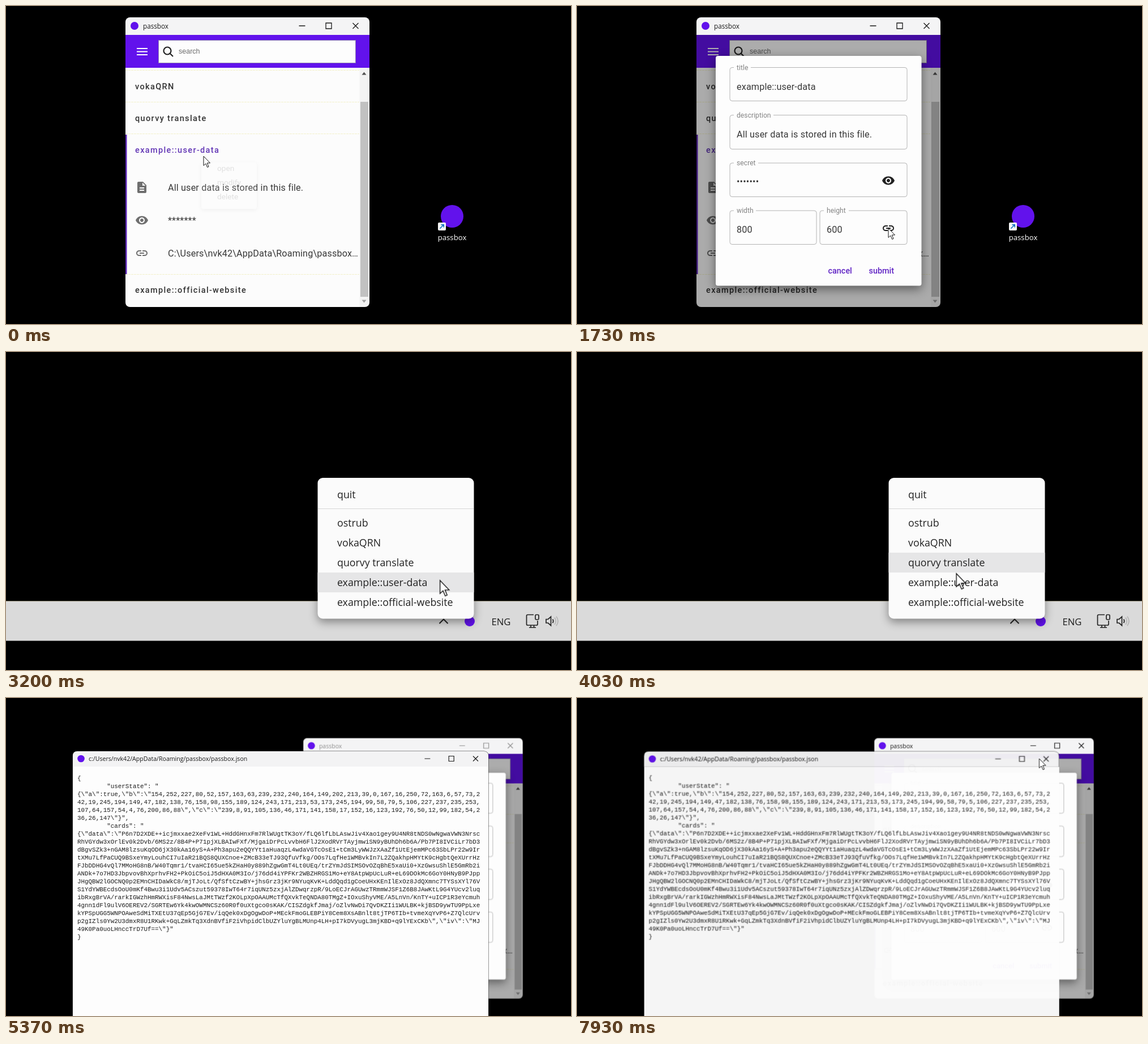
Write an HTML page that moves like this. It is 998 px wide and 561 px high and loops after 8 s.

```html
<!DOCTYPE html>
<html lang="en">
<head>
<meta charset="utf-8">
<title>passbox</title>
<style>
html, body { margin: 0; width: 100%; height: 100%; overflow: hidden; background: #000; }
svg { display: block; width: 998px; height: 561px; }
text { font-family: Roboto, sans-serif; }
.ui, .ui text { font-family: "Open Sans", "Noto Sans", sans-serif; }
.name { font-size: 14.5px; font-weight: 500; letter-spacing: 1.35px; fill: #333; }
.body { font-size: 16.2px; letter-spacing: .15px; fill: #383838; }
.label { font-size: 12.2px; fill: #858585; }
.button { font-size: 14.4px; font-weight: 500; fill: #5f22c4; }
.field { fill: none; stroke: #b4b4b4; }
.focus { stroke: #5520b4; stroke-width: 2px; }
.gap { fill: #fdfdfd; }
.accent { fill: #6236b5; }
.brand { fill: #6212ec; }
.rule { stroke: #f3f1cc; }
#json text { font: 10.88px "Liberation Mono", "Courier New", monospace; fill: #1c1c1c; }

/* one loop: 1% = 80 ms */
.t, .s { animation: 8s linear infinite; }
.s { animation-timing-function: step-end; }

#win { animation-name: win; }
@keyframes win {
  0% { opacity: 1; transform: none; }
  26% { opacity: 0; transform: none; }
  62.875%, 100% { opacity: 1; transform: translate(335.1px, 52.6px) scale(.9); }
}
#caption { animation-name: caption; }
@keyframes caption {
  0% { color: #1a1a1a; }
  62.875% { color: #8f8f8f; }
  82.4%, 100% { color: #1a1a1a; }
}
#desktop { animation-name: desktop; }
@keyframes desktop { 0% { opacity: 1; } 26%, 100% { opacity: 0; } }

#context { animation-name: context; }
@keyframes context {
  0% { opacity: .12; }
  1.9%, 6.2% { opacity: 1; }
  7.2%, 100% { opacity: 0; }
}
#scrim { animation-name: scrim; }
@keyframes scrim { 0%, 6.5% { opacity: 0; } 8.4%, 100% { opacity: .32; } }
#dialog { animation-name: dialog; transform-origin: 426px 290px; }
@keyframes dialog {
  0%, 6.5% { opacity: 0; transform: scale(.8); }
  8.4%, 100% { opacity: 1; transform: none; }
}
#urlMode { animation-name: urlMode; }
@keyframes urlMode { 0% { opacity: 1; } 18%, 100% { opacity: 0; } }
#sizeMode { animation-name: sizeMode; }
@keyframes sizeMode { 0% { opacity: 0; } 18%, 100% { opacity: 1; } }
#caret { animation-name: caret; }
@keyframes caret { 0% { opacity: 1; } 14.1%, 100% { opacity: 0; } }

#taskbar { animation-name: taskbar; }
@keyframes taskbar { 0% { opacity: 0; } 26% { opacity: 1; } 62.875%, 100% { opacity: 0; } }
#trayHover { animation-name: trayHover; }
@keyframes trayHover { 0% { opacity: 0; } 29.5% { opacity: 1; } 38%, 100% { opacity: 0; } }
#trayMenu { animation-name: trayMenu; }
@keyframes trayMenu { 0% { opacity: 0; } 36.9% { opacity: 1; } 62.3%, 100% { opacity: 0; } }
#row { animation-name: row; }
@keyframes row {
  0% { opacity: 0; transform: translateY(70px); }
  37.3% { opacity: 1; transform: translateY(70px); }
  39% { opacity: 1; transform: translateY(35px); }
  40.7% { opacity: 1; transform: none; }
  42.4% { opacity: 1; transform: translateY(-35px); }
  46.7% { opacity: 1; transform: none; }
  50.6%, 100% { opacity: 1; transform: translateY(35px); }
}

#doc { animation-name: doc; }
@keyframes doc {
  0%, 62.87% { opacity: 0; transform: translate(42px, 33px) scale(.9); }
  62.88% { opacity: .7; transform: translate(36px, 28px) scale(.915); }
  63.75% { opacity: .94; transform: translate(20.8px, 16.6px) scale(.951); }
  65%, 82.4% { opacity: 1; transform: none; }
  82.41%, 100% { opacity: .97; transform: translate(.7px, .6px) scale(.998); }
}
#page { animation-name: page; }
@keyframes page { 0% { opacity: 0; } 67%, 100% { opacity: 1; } }
#maxHover { animation-name: maxHover; }
@keyframes maxHover { 0%, 76% { opacity: 0; } 77%, 77.9% { opacity: 1; } 79%, 100% { opacity: 0; } }
#closeHover { animation-name: closeHover; }
@keyframes closeHover {
  0%, 76.9% { opacity: 0; }
  77.875% { opacity: .4; }
  79%, 82.4% { opacity: 1; }
  82.41%, 100% { opacity: 0; }
}
#closeMark { animation-name: closeMark; }
@keyframes closeMark {
  0%, 76.9% { color: #1a1a1a; }
  77.875% { color: #a58a87; }
  79%, 82.4% { color: #fff; }
  82.41%, 100% { color: #1a1a1a; }
}

#pointer { animation-name: pointer; }
@keyframes pointer {
  0%, 1.25% { opacity: 1; transform: translate(349px, 265px); }
  5.25%, 6.5% { opacity: 1; transform: translate(385px, 312px); }
  6.51% { opacity: 0; transform: translate(385px, 312px); }
  11.49% { opacity: 0; transform: translate(400px, 300px); }
  11.5% { opacity: 1; transform: translate(400px, 300px); }
  16.9%, 25.99% { opacity: 1; transform: translate(550px, 392px); }
  26% { opacity: 1; transform: translate(720px, 360px) scale(1.4); }
  31.2%, 31.7% { opacity: 1; transform: translate(830px, 447px) scale(1.4); }
  34.4%, 36.9% { opacity: 1; transform: translate(822px, 468px) scale(1.4); }
  43.75% { opacity: 1; transform: translate(700px, 325px) scale(1.4); }
  50.4% { opacity: 1; transform: translate(670px, 391px) scale(1.4); }
  53%, 62.87% { opacity: 1; transform: translate(662px, 408px) scale(1.4); }
  62.88%, 68.74% { opacity: 0; transform: translate(760px, 250px); }
  68.75% { opacity: 1; transform: translate(760px, 250px); }
  76.9%, 78% { opacity: 1; transform: translate(815.5px, 108px); }
  82.4%, 100% { opacity: 1; transform: translate(816.5px, 107px); }
}
</style>
</head>
<body>
<svg viewBox="0 0 998 561">
  <defs>
    <clipPath id="winShape"><rect x="211" y="20" width="431" height="511" rx="8"/></clipPath>
    <clipPath id="urlBox"><rect x="280" y="375" width="250" height="35"/></clipPath>
    <path id="minMax" d="M-52.5 0H-41.5M-5 -5H5V5H-5Z" fill="none" stroke="currentColor" stroke-width="1.3"/>
    <path id="cross" d="M-5 -5L5 5M5 -5L-5 5" fill="none" stroke="currentColor" stroke-width="1.3"/>
    <path id="eye" d="M12 4.5C7 4.5 2.73 7.61 1 12c1.73 4.39 6 7.5 11 7.5s9.27-3.11 11-7.5c-1.73-4.39-6-7.5-11-7.5zM12 17c-2.76 0-5-2.24-5-5s2.24-5 5-5 5 2.24 5 5-2.24 5-5 5zm0-8c-1.66 0-3 1.34-3 3s1.34 3 3 3 3-1.34 3-3-1.34-3-3-3z"/>
    <path id="link" d="M3.9 12c0-1.71 1.39-3.1 3.1-3.1h4V7H7c-2.76 0-5 2.24-5 5s2.24 5 5 5h4v-1.9H7c-1.71 0-3.1-1.39-3.1-3.1zM8 13h8v-2H8v2zm9-6h-4v1.9h4c1.71 0 3.1 1.39 3.1 3.1s-1.39 3.1-3.1 3.1h-4V17h4c2.76 0 5-2.24 5-5s-2.24-5-5-5z"/>
    <g id="gear" fill="none" stroke="#222">
      <circle r="5.3" stroke-width="4"/>
      <circle r="8" stroke-width="4" stroke-dasharray="4.6 3.778" transform="rotate(14)"/>
    </g>
  </defs>

  <g id="desktop" class="s">
    <circle class="brand" cx="788" cy="371" r="20"/>
    <rect x="763" y="382" width="14" height="14" rx="2" fill="#f6f6f6"/>
    <path d="M766.5 392.5L773 386M768.5 385.8H773.2V390.5" fill="none" stroke="#1673c4" stroke-width="1.7"/>
    <text class="ui" x="788" y="413" font-size="13.2" fill="#fff" text-anchor="middle">passbox</text>
  </g>

  <g id="win" class="s">
    <g clip-path="url(#winShape)">
      <rect x="211" y="20" width="431" height="511" fill="#fcfcfc"/>
      <rect x="211" y="20" width="431" height="31" fill="#f4f4f5"/>
      <circle class="brand" cx="227" cy="35" r="7"/>
      <g id="caption" class="s">
        <text class="ui" x="242" y="39.5" font-size="11.7" fill="currentColor">passbox</text>
        <use href="#minMax" x="570" y="35"/>
        <use href="#cross" x="617.5" y="35"/>
      </g>

      <rect class="brand" x="211" y="51" width="431" height="58"/>
      <path d="M231 75H250M231 80.5H250M231 86H250" stroke="#fff" stroke-width="2"/>
      <rect x="269.5" y="60.5" width="348" height="40" fill="#fdfdfd" stroke="#8d7fb0"/>
      <g fill="none" stroke="#222" stroke-width="2.2"><circle cx="285" cy="79" r="6.5"/><path d="M289.5 83.5L295 89"/></g>
      <text x="305" y="84" font-size="12.5" fill="#6c6c6c" style="font-family:'Liberation Sans',Arial,sans-serif">search</text>

      <path class="rule" stroke-dasharray="4 1" d="M211 113.5H624M211 169.5H624M211 225.5H624M211 473.5H624"/>
      <text class="name" x="228" y="147">vokaQRN</text>
      <text class="name" x="228" y="203">quorvy translate</text>
      <rect x="211" y="227" width="2.5" height="246" fill="#5b25b5"/>
      <text class="name accent" x="228" y="259">example::user-data</text>
      <text class="name" x="228" y="506">example::official-website</text>
      <g fill="#6f6f6f">
        <path transform="translate(228 308)" d="M14 2H6c-1.1 0-2 .9-2 2v16c0 1.1.9 2 2 2h12c1.1 0 2-.9 2-2V8l-6-6zm2 16H8v-2h8v2zm0-4H8v-2h8v2zm-3-5V3.5L18.5 9H13z"/>
        <use href="#eye" x="228" y="366"/>
        <use href="#link" x="228" y="424"/>
      </g>
      <text class="body" x="286" y="326">All user data is stored in this file.</text>
      <text class="body" x="286" y="384">*******</text>
      <text class="body" x="286" y="442">C:\Users\nvk42\AppData\Roaming\passbox…</text>

      <rect x="624.5" y="109" width="18" height="422" fill="#f3f3f3"/>
      <rect x="626" y="169" width="14" height="344" fill="#c1c1c1"/>
      <path d="M628.5 121.5L632.5 116.5L636.5 121.5Z" fill="#505050"/>
      <path d="M628.5 518.5L632.5 523.5L636.5 518.5Z" fill="#a0a0a0"/>

      <g id="context" class="t">
        <rect x="345" y="276" width="98" height="82" rx="4" fill="#fdfdfd" style="filter:drop-shadow(0 2px 4px #0006)"/>
        <g font-size="13.7" fill="#2c2c2c">
          <text x="373" y="291">open</text><text x="373" y="316">modify</text><text x="373" y="341">delete</text>
        </g>
      </g>

      <rect id="scrim" class="t" x="211" y="51" width="431" height="480"/>
      <g id="dialog" class="t">
        <rect x="245" y="88" width="363.5" height="405.5" rx="4" fill="#fdfdfd" style="filter:drop-shadow(0 6px 9px #0007)"/>
        <rect class="field" x="270" y="108.5" width="313" height="59" rx="4"/>
        <rect class="field" x="270" y="192.5" width="313" height="60" rx="4"/>
        <rect class="field" x="270" y="277" width="313" height="59.5" rx="4"/>
        <path class="gap" d="M277 104H307V112H277ZM277 188H347V197H277ZM277 272H320V281H277Z"/>
        <text class="label" x="282" y="112.5">title</text>
        <text class="label" x="282" y="196.5">description</text>
        <text class="label" x="282" y="280.5">secret</text>
        <text class="body" x="282" y="148">example::user-data</text>
        <text class="body" x="282" y="232">All user data is stored in this file.</text>
        <text class="body" x="282" y="315">•••••••</text>
        <use href="#eye" x="538" y="296" fill="#222"/>

        <g id="urlMode" class="s">
          <rect class="field focus" x="270.5" y="108.5" width="312" height="59" rx="4"/>
          <path class="gap" d="M277 104H307V112H277Z"/>
          <text class="label accent" x="282" y="112.5">title</text>
          <path id="caret" class="s" d="M423.5 133V152" stroke="#333"/>
          <rect class="field" x="270" y="361" width="313" height="59.5" rx="4"/>
          <rect class="gap" x="277" y="357" width="23" height="8"/>
          <text class="label" x="282" y="364.5">url</text>
          <g clip-path="url(#urlBox)"><text class="body" x="282" y="400">C:\Users\nvk42\AppData\Roaming\passbox</text></g>
          <use href="#gear" x="550" y="392"/>
        </g>
        <g id="sizeMode" class="s">
          <rect class="field" x="270" y="361" width="153" height="59.5" rx="4"/>
          <rect class="field" x="429" y="361" width="154" height="59.5" rx="4"/>
          <path class="gap" d="M277 357H316V365H277ZM436 357H480V365H436Z"/>
          <text class="label" x="282" y="364.5">width</text>
          <text class="label" x="441" y="364.5">height</text>
          <text class="body" x="282" y="400">800</text>
          <text class="body" x="441" y="400">600</text>
          <use href="#link" x="538" y="380" fill="#222"/>
        </g>
        <text class="button" x="443.5" y="472">cancel</text>
        <text class="button" x="515.5" y="472">submit</text>
      </g>
    </g>
  </g>

  <g id="taskbar" class="s ui">
    <rect y="439.5" width="998" height="70" fill="#dadada"/>
    <path d="M0 439.5H998" stroke="#8f8a74"/>
    <rect id="trayHover" class="s" x="798" y="447" width="43" height="56" rx="4" fill="#e8e8e8"/>
    <path d="M765.5 479L773 471.5L780.5 479" fill="none" stroke="#222" stroke-width="2"/>
    <circle class="brand" cx="819" cy="475" r="9"/>
    <text x="857.5" y="482" font-size="16.7" fill="#1c1c1c">ENG</text>
    <g fill="none" stroke="#222" stroke-width="1.7">
      <path d="M932 463.5H921.5Q919.5 463.5 919.5 465.5V480Q919.5 482 921.5 482H937Q939 482 939 480V474M924 486H936M927 482V486M932.5 482V486"/>
      <rect x="935" y="463.5" width="6" height="8.5" rx="1.5"/>
      <path d="M954 471.5H957.5L962.5 467V482.5L957.5 478H954ZM965.5 471.5Q968 474.7 965.5 478"/>
      <path d="M969 468.5Q973 474.7 969 481M972 466.5Q978 474.7 972 483" stroke="#b5b5b5"/>
    </g>
    <g id="trayMenu" class="s">
      <rect x="550.5" y="222" width="276" height="248.5" rx="9" fill="#fbfbfb" style="filter:drop-shadow(0 6px 8px #0006)"/>
      <path d="M551 276.5H826" stroke="#d6d6d6"/>
      <rect id="row" class="s" x="550.5" y="354" width="276" height="35" fill="#e6e6e7"/>
      <g font-size="17.8" fill="#222">
        <text x="585" y="258">quit</text>
        <text x="585" y="308">ostrub</text>
        <text x="585" y="343">vokaQRN</text>
        <text x="585" y="378">quorvy translate</text>
        <text x="585" y="413">example::user-data</text>
        <text x="585" y="448">example::official-website</text>
      </g>
    </g>
  </g>

  <g id="doc" class="t">
    <path d="M118 640V102Q118 94 126 94H844Q852 94 852 102V640Z" stroke="#333"/>
    <g id="page" class="s">
      <rect x="118" y="121" width="734" height="520" fill="#fdfdfd"/>
      <g id="json"></g>
    </g>
    <path d="M118 121V102Q118 94 126 94H844Q852 94 852 102V121Z" fill="#f3f3f4"/>
    <rect id="maxHover" class="t" x="767" y="94" width="39" height="27" fill="#e7e7e8"/>
    <path id="closeHover" class="t" d="M811 121V94H844Q852 94 852 102V121Z" fill="#c93a2a"/>
    <circle class="brand" cx="132.5" cy="107" r="6.3"/>
    <text class="ui" x="146" y="111" font-size="10.6" fill="#1a1a1a">c:/Users/nvk42/AppData/Roaming/passbox/passbox.json</text>
    <use href="#minMax" transform="translate(786.7 107) scale(.9)" color="#1a1a1a"/>
    <g id="closeMark" class="t"><use href="#cross" transform="translate(829.5 107) scale(.9)"/></g>
  </g>

  <path id="pointer" class="t" d="M0 0V16.5L3.8 13L6.6 19.5L9 18.5L6.3 12H11.5Z" fill="#fff" stroke="#111"/>
</svg>
<script>
const COLUMNS = 109;
const ALPHABET = 'ABCDEFGHIJKLMNOPQRSTUVWXYZabcdefghijklmnopqrstuvwxyz0123456789+/';
let seed = 7;

function cipherText(length) {
  return Array.from({ length }, () => {
    seed = (seed * 1664525 + 1013904223) >>> 0;
    return ALPHABET[seed >>> 26];
  }).join('');
}

const wrap = text => text.match(new RegExp(`.{1,${COLUMNS}}`, 'g'));
const tab = '\u00a0'.repeat(8);

const state = String.raw`{\"a\":true,\"b\":\"154,252,227,80,52,157,163,63,239,232,240,164,149,202,213,39,0,167,16,250,72,163,6,57,73,242,19,245,194,149,47,182,138,76,158,98,155,189,124,243,171,213,53,173,245,194,99,58,79,5,106,227,237,235,253,107,64,157,54,4,76,200,86,88\",\"c\":\"239,8,91,105,136,46,171,141,158,17,152,16,123,192,76,50,12,99,182,54,236,26,147\"}",`;
const cards = String.raw`{\"data\":\"${cipherText(1282)}\",\"iv\":\"${cipherText(22)}==\"}"`;

const lines = ['{', tab + '"userState": "', ...wrap(state), tab + '"cards": "', ...wrap(cards), '}'];
document.getElementById('json').innerHTML = lines
  .map((line, i) => `<text x="126" y="${144.5 + i * 14}">${line}</text>`)
  .join('');
</script>
</body>
</html>
```
